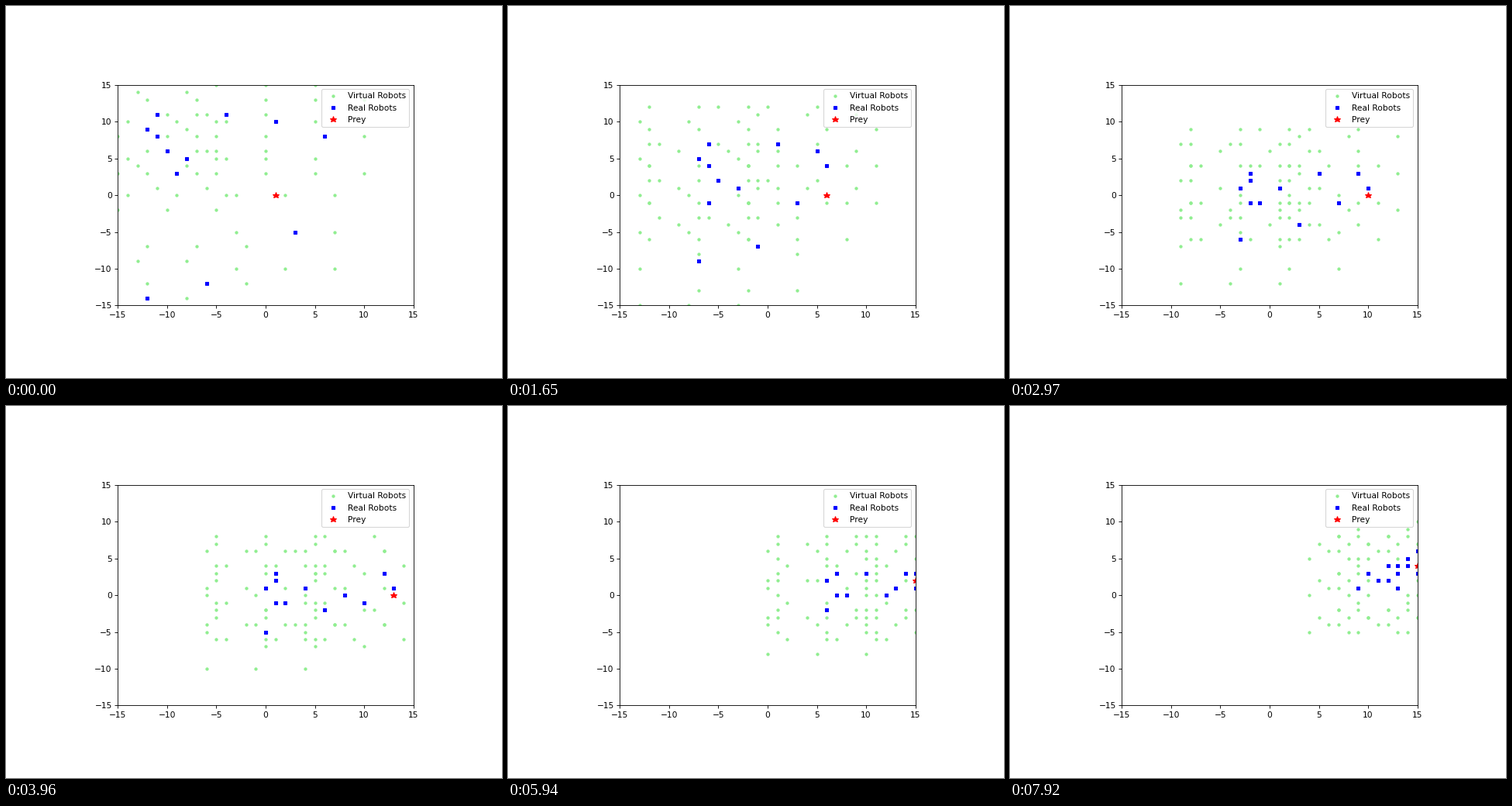
Write a matplotlib script that moves like this. It is 640 by 480 pixels and loops after 8 s.

```python
import numpy as np
import matplotlib.pyplot as plt
from matplotlib.animation import FuncAnimation

INTERVAL = 40     # ms between drawn frames
FRAMES = 200
STEP_MS = 330     # ms between simulation steps
MEET_STEP = 12    # the swarm reaches the prey's row
END_STEP = 24
SPACING = 5       # distance from a robot to its virtual neighbours
SCALE = 0.77      # size of text, lines and markers

# Key points of each real robot: start, meeting and end cell.
START = np.array([(-12, -14), (-6, -12), (3, -5), (6, 8), (1, 10), (-4, 11),
                  (-8, 5), (-9, 3), (-10, 6), (-11, 8), (-11, 11), (-12, 9)])
MEET = np.array([(0, -5), (6, -2), (10, -1), (13, 1), (12, 3), (8, 0),
                 (4, 1), (1, -1), (2, -1), (1, 2), (1, 3), (0, 1)])
END = np.array([(9, 1), (12, 2), (15, 3), (15, 6), (14, 4), (13, 3),
                (14, 5), (11, 2), (13, 1), (13, 4), (12, 4), (10, 3)])
OFFSETS = [(i * SPACING, j * SPACING)
           for i in (-1, 0, 1) for j in (-1, 0, 1) if i or j]


def approach(a, b, reach):
    """Move from a toward b, at most reach cells."""
    return a + np.clip(b - a, -reach, reach)


def real_robots(step):
    """Cells of the real robots; each moves about one cell per step."""
    (x0, y0), (xm, ym), (x1, y1) = START.T, MEET.T, END.T
    if step <= MEET_STEP:
        x = np.maximum(x0, xm - (MEET_STEP - step)) + min(step, 0)
        y = np.floor(approach(y0, ym, 0.9 * max(step, 0)) + 0.5)
    else:
        s = step - MEET_STEP
        x = approach(xm, x1, s)
        y = np.floor(ym + (y1 - ym) * s / (END_STEP - MEET_STEP))
    return x, y


def virtual_robots(step):
    """Eight neighbours around each robot's previous cell."""
    x, y = real_robots(step - 1)
    vx = np.concatenate([x + dx for dx, _ in OFFSETS])
    vy = np.concatenate([y + dy for _, dy in OFFSETS])
    keep = vx <= 10 + step // 3
    return vx[keep], vy[keep]


def prey_cell(step):
    return [min(1 + step, 15)], [max(0, (step - MEET_STEP) // 3)]


plt.rcParams.update({key: plt.rcParams[key] * SCALE for key in (
    'font.size', 'axes.linewidth', 'patch.linewidth', 'lines.markeredgewidth',
    'xtick.major.size', 'xtick.major.width', 'xtick.major.pad',
    'ytick.major.size', 'ytick.major.width', 'ytick.major.pad')})

fig = plt.figure(figsize=(6.4, 4.8), dpi=100)
ax = fig.add_axes([144.2 / 640, 0.195, 381.5 / 640, 0.593])
ax.set(xlim=(-15, 15), ylim=(-15, 15),
       xticks=range(-15, 16, 5), yticks=range(-15, 16, 5))


def layer(marker, color, size, label):
    return ax.plot([], [], marker, color=color, ms=size * SCALE,
                   label=label)[0]


virtual = layer('.', 'lightgreen', 6, 'Virtual Robots')
real = layer('s', 'blue', 4, 'Real Robots')
prey = layer('*', 'red', 8, 'Prey')
ax.legend(loc='upper right')


def update(frame):
    step = (frame * INTERVAL + 30) // STEP_MS
    virtual.set_data(*virtual_robots(step))
    real.set_data(*real_robots(step))
    prey.set_data(*prey_cell(step))
    return virtual, real, prey


anim = FuncAnimation(fig, update, frames=FRAMES, interval=INTERVAL,
                     init_func=lambda: update(0), repeat=True,
                     repeat_delay=0, blit=False)
plt.show()
```
